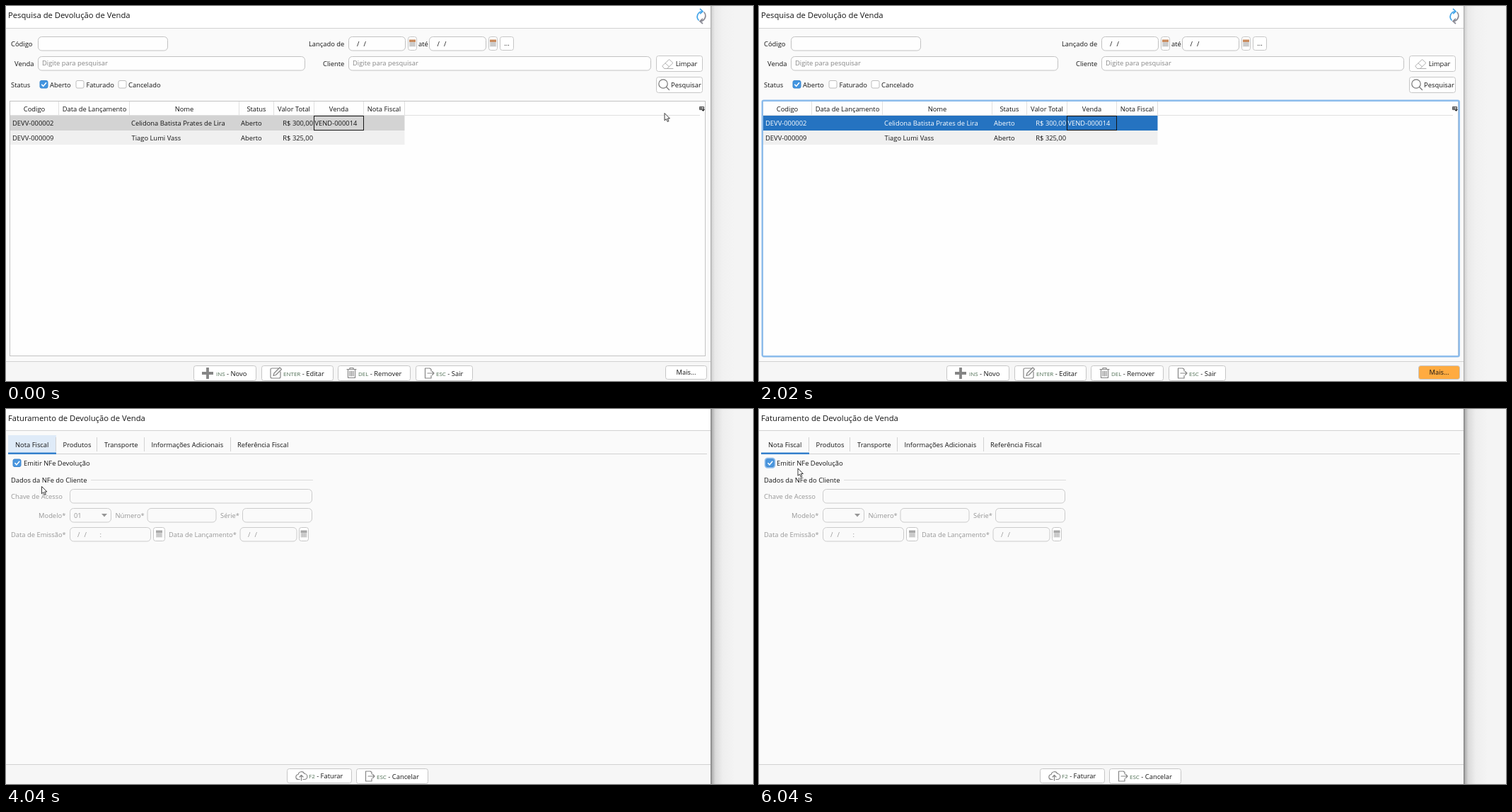
Animation, 1056 px wide and 530 px high, one loop 6540 ms. Source, as an HTML page:

```html
<!DOCTYPE html>
<html lang="pt-BR">
<head>
<meta charset="utf-8">
<title>Devolução de Venda</title>
<style>
html, body { margin: 0; width: 100%; height: 100%; overflow: hidden; background: #f4f4f4; }
svg { display: block; width: 100%; height: 100%; animation: run 6540ms step-end infinite; }
text { font: 9.4px "Open Sans", "Noto Sans", sans-serif; fill: #141414; white-space: pre; }
.title { font-size: 11.25px; }
.key { font-size: 8px; fill: #4f6f54; }
.mid text, .mid { text-anchor: middle; }
.hint { fill: #858585; }
.box rect { height: 19.5px; fill: #fefefe; stroke: #c2c2c2; rx: 5px; }
.btn rect { fill: #fff; stroke: #c6c6c6; rx: 3px; }
.rule { stroke: #d2d2d2; fill: none; }
.icon { fill: none; stroke: #858585; stroke-width: 1.2; stroke-linejoin: round; stroke-linecap: round; }
.ring { fill: none; stroke: #8cbcec; stroke-width: 2.4; }

.list { opacity: var(--list); }
.bill { opacity: var(--bill); }
.pointer { opacity: var(--seen); transform: translate(var(--x), var(--y)); }
.halo { fill: #fe0; opacity: calc(var(--halo) * .56); }

.btn .go { fill: var(--go); }
.go-ring { opacity: var(--go-ring); }
.go-icon { stroke: var(--go-icon); }
.go-text { fill: var(--go-ink); font-weight: var(--go-weight); }

.btn .more { fill: var(--more); }
.more-ring { opacity: var(--more-ring); }
.more-text { fill: var(--more-ink); font-weight: var(--more-weight); }

.table-ring { opacity: var(--table); }
.row { fill: var(--row); }
.picked text { fill: var(--row-ink); }
.menu { opacity: var(--menu); }
.hot { opacity: var(--hot); }

.tab { opacity: var(--tab); }
.check { fill: var(--check); stroke: var(--check-edge); }
.check-ring { opacity: var(--check-ring); }
.tick { fill: none; stroke: #fff; stroke-width: 1.6; }
.toggle { opacity: var(--tick); }
.fields text { fill: var(--ink); }
.fields .box rect { fill: #fafafa; stroke: #cbcbcb; }
.fields .model { opacity: var(--model); }
.fields .cal { --top: var(--cal); }
.arrow { fill: var(--ink); }

@keyframes run {
  0% {
    --list: 1; --bill: 0; --seen: 1; --x: 930.5px; --y: 151px; --halo: 0;
    --go: #fff; --go-ring: 0; --go-icon: #777; --go-ink: #141414; --go-weight: 400;
    --more: #fff; --more-ring: 0; --more-ink: #141414; --more-weight: 400;
    --table: 0; --row: #d3d3d3; --row-ink: #141414; --menu: 0; --hot: 0;
    --tab: 0; --check: #4a97df; --check-edge: #3d86cf; --check-ring: 0; --tick: 1;
    --ink: #969696; --cal: #a8a8a8; --model: 1;
  }
  7.645% { --x: 960px; --y: 113px; --go: #ffab40; }
  15.902% { --halo: 1; --go: #3470b2; --go-ring: 1; --go-icon: #fff; --go-ink: #fff; --go-weight: 700; }
  23.394% {
    --x: 962px; --y: 272px; --halo: 0;
    --go: #fff; --go-ring: 0; --go-icon: #777; --go-ink: #141414; --go-weight: 400;
    --table: 1; --row: #2573c1; --row-ink: #fff;
  }
  30.887% { --seen: 0; --more: #ffab40; }
  38.838% {
    --seen: 1; --x: 988px; --y: 515px; --halo: 1;
    --more: #3470b2; --more-ring: 1; --more-ink: #fff; --more-weight: 700;
    --table: 0; --row: #d3d3d3; --row-ink: #141414;
  }
  46.483% { --halo: 0; --more: #ffab40; --more-ink: #141414; --more-weight: 400; --menu: 1; }
  54.128% { --x: 985px; --y: 465.5px; --halo: 1; --more: #fff; --hot: 1; }
  61.774% { --list: 0; --bill: 1; --x: 50px; --y: 109px; --halo: 0; --tab: 1; }
  69.419% { --x: 54.5px; --y: 83.5px; --halo: 1; --tab: 0; --check: #2b7fd2; --check-ring: 1; }
  77.064% { --halo: 0; --check: #fff; --check-edge: #6ea9e2; --tick: 0; --ink: #141414; --cal: #c98a5c; }
  84.709% { --halo: 1; --check: #d8e8f8; }
  92.355% {
    --halo: 0; --check: #4a97df; --check-edge: #3d86cf; --tick: 1;
    --ink: #969696; --cal: #a8a8a8; --model: 0;
  }
}
</style>
</head>
<body>
<svg viewBox="0 0 1056 530">
<defs>
  <linearGradient id="soft">
    <stop offset="0" stop-color="#979797"/>
    <stop offset=".05" stop-color="#d4d4d4"/>
    <stop offset=".18" stop-color="#e9e9e9"/>
    <stop offset=".5" stop-color="#f1f1f1"/>
    <stop offset="1" stop-color="#f4f4f4"/>
  </linearGradient>
  <linearGradient id="deep">
    <stop offset="0" stop-color="#767676"/>
    <stop offset=".07" stop-color="#b2b2b2"/>
    <stop offset=".2" stop-color="#dadada"/>
    <stop offset=".5" stop-color="#eee"/>
    <stop offset="1" stop-color="#f4f4f4"/>
  </linearGradient>
  <g id="cal">
    <path d="M0 3.500h9v7H0z" fill="#d3d3d3"/>
    <path d="M0 .500h9v3.400H0z" style="fill: var(--top, #c98a5c)"/>
    <path d="M1 6h7M1 8.500h7M3 4.500v5.500M6 4.500v5.500" stroke="#b8b8b8" stroke-width=".5"/>
  </g>
  <g id="exit" class="icon">
    <path d="M9 4.500V2L7 .500H.500v14H9V11M4 7.500h9M10.500 5l2.500 2.500-2.500 2.500"/>
  </g>
</defs>

<!-- window -->
<rect width="1056" height="530" fill="#f4f4f4"/>
<rect width="996" height="530" fill="#fafafa"/>
<rect width="996" height="31" fill="#fff"/>
<rect y="502" width="996" height="28" fill="#f6f6f6"/>
<path class="rule" d="M0 502.500H996"/>

<!-- search list -->
<g class="list">
  <rect x="996" width="34" height="530" fill="url(#soft)"/>
  <path class="rule" d="M0 31.500H996"/>
  <text class="title" x="3" y="16.500">Pesquisa de Devolução de Venda</text>
  <g fill="none" stroke-width="1.700">
    <path d="M979.500 20.500A7.600 7.600 0 0 1 984.500 7.500M981 3.800l4 3.800-4 3.400" stroke="#45a5e8"/>
    <path d="M986.500 8.500a7.600 7.600 0 0 1-5 13M985 17.800l-4 3.700 4 3.500" stroke="#8b8b95"/>
  </g>

  <g class="box">
    <rect x="45.500" y="43.500" width="183"/>
    <rect x="45.500" y="71.500" width="377"/>
    <rect x="484.500" y="43.500" width="80"/>
    <rect x="598.500" y="43.500" width="80"/>
    <rect x="484.500" y="71.500" width="427"/>
  </g>
  <text x="7" y="56.500">Código</text>
  <text x="12" y="84.500">Venda</text>
  <text x="7" y="114.500">Status</text>
  <text x="428" y="56.500">Lançado de</text>
  <text x="583" y="56.500">até</text>
  <text x="448" y="84.500">Cliente</text>
  <text class="hint" x="51" y="84">Digite para pesquisar</text>
  <text class="hint" x="490" y="84">Digite para pesquisar</text>
  <text x="496 505.500" y="57">//</text>
  <text x="609.500 619" y="57">//</text>

  <g class="btn">
    <rect x="568.500" y="43.500" width="12" height="19"/>
    <rect x="682.500" y="43.500" width="12" height="19"/>
    <rect x="698.500" y="43.500" width="19" height="19"/>
    <rect x="919.500" y="70.500" width="65" height="22"/>
    <rect class="go" x="919.500" y="100.500" width="65" height="22"/>
  </g>
  <use href="#cal" x="570" y="47"/>
  <use href="#cal" x="684" y="47"/>
  <text class="mid" x="708" y="56">...</text>
  <path class="icon" d="M928 84.500l9.500-9 5.500 5-8.500 8h-3.500zM932 80.800l5.500 5M931 88.500h12" style="stroke: #b0b0b0; stroke-width: 1"/>
  <text class="mid" x="962" y="84.500">Limpar</text>
  <g class="icon go-icon">
    <circle cx="929" cy="110" r="6.200"/>
    <path d="M933.500 114.500l4 4"/>
  </g>
  <rect class="ring go-ring" x="918.500" y="99.300" width="67" height="24" rx="3"/>
  <text class="mid go-text" x="961.500" y="114.500">Pesquisar</text>

  <rect x="48" y="105.500" width="11" height="10.500" rx="2" fill="#4295e0" stroke="#3986ce"/>
  <path class="tick" d="M50.300 110.800l2.400 2.600 4.300-5.200"/>
  <g fill="#fff" stroke="#bdbdbd">
    <rect x="99" y="105.500" width="11" height="10.500" rx="2"/>
    <rect x="159" y="105.500" width="11" height="10.500" rx="2"/>
  </g>
  <text x="62" y="114.500">Aberto</text>
  <text x="113.500" y="114.500">Faturado</text>
  <text x="173" y="114.500">Cancelado</text>

  <!-- results -->
  <rect x="5.500" y="134.500" width="983" height="360" fill="#fefefe" stroke="#c4c4c4"/>
  <path class="rule" style="stroke: #e0e0e0" d="M6 154.500H981M74.500 135v20M174.500 135v20M329.500 135v20M378.500 135v20M435.500 135v20M505.500 135v20M563.500 135v20"/>
  <path d="M980.500 142.500h6v4h-6zM980.500 144.500h6M982.500 142.500v4" fill="none" stroke="#333" stroke-width=".9"/>
  <path d="M983 146h5l-2.500 3z" fill="#222"/>
  <g class="mid">
    <text x="40" y="148.500">Codigo</text>
    <text x="125" y="148.500">Data de Lançamento</text>
    <text x="252" y="148.500">Nome</text>
    <text x="354" y="148.500">Status</text>
    <text x="407" y="148.500">Valor Total</text>
    <text x="470.500" y="148.500">Venda</text>
    <text x="534.500" y="148.500">Nota Fiscal</text>
  </g>
  <rect class="row" x="6" y="155" width="557.500" height="21"/>
  <rect x="6" y="176" width="557.500" height="20" fill="#f0f0f0"/>
  <rect x="435.500" y="155.500" width="70" height="20" fill="none" stroke="#161616"/>
  <g class="picked">
    <text x="9" y="169">DEVV-000002</text>
    <text x="177" y="169">Celidona Batista Prates de Lira</text>
    <text x="332" y="169">Aberto</text>
    <text x="434" y="169" text-anchor="end">R$ 300,00</text>
    <text x="436.500" y="169">VEND-000014</text>
  </g>
  <text x="9" y="189.500">DEVV-000009</text>
  <text x="177.500" y="189.500">Tiago Lumi Vass</text>
  <text x="332" y="189.500">Aberto</text>
  <text x="434" y="189.500" text-anchor="end">R$ 325,00</text>
  <rect class="ring table-ring" x="4.700" y="133.700" width="985" height="361.600" rx="2"/>

  <!-- actions -->
  <g class="btn">
    <rect x="265.500" y="508.500" width="88" height="21"/>
    <rect x="361.500" y="508.500" width="101" height="21"/>
    <rect x="469.500" y="508.500" width="102" height="21"/>
    <rect x="579.500" y="508.500" width="80" height="21"/>
    <rect class="more" x="932.500" y="508.500" width="58" height="19"/>
  </g>
  <path d="M285 511v16M277 519h16" stroke="#858585" stroke-width="3.800"/>
  <path class="icon" d="M385 512h-9q-2 0-2 2v10q0 2 2 2h10q2 0 2-2v-7M378 522.500l1-3.500 8-8 2.500 2.500-8 8z"/>
  <path class="icon" d="M482 513.500h13M486 513.500v-2h5v2M483.500 513.500v12h10v-12M486.200 516v7M488.500 516v7M490.800 516v7"/>
  <use href="#exit" x="592" y="511.500"/>
  <text x="297" y="522.500"><tspan class="key">INS</tspan> - Novo</text>
  <text x="392" y="522.500"><tspan class="key">ENTER</tspan> - Editar</text>
  <text x="498" y="522.500"><tspan class="key">DEL</tspan> - Remover</text>
  <text x="608" y="522.500"><tspan class="key">ESC</tspan> - Sair</text>
  <rect class="ring more-ring" x="931.700" y="507.600" width="60" height="20.800" rx="3"/>
  <text class="mid more-text" x="961.500" y="521">Mais...</text>

  <g class="menu">
    <rect x="932" y="456" width="122" height="52" fill="#000" opacity=".1"/>
    <rect x="930.500" y="455.500" width="122" height="51" fill="#fff" stroke="#bdbdbd"/>
    <g class="hot">
      <rect x="931" y="456" width="121" height="24" fill="#e7e7e7"/>
      <rect x="931" y="457" width="3" height="21" fill="#3f88d2"/>
    </g>
    <path class="rule" d="M931 480.500h121"/>
    <text x="954" y="471">Faturamento</text>
    <text x="1030" y="471" style="fill: #777">F2</text>
    <text x="954.500" y="497" style="fill: #9a9a9a">Documento Fiscal</text>
  </g>
</g>

<!-- billing form -->
<g class="bill">
  <rect x="996" width="34" height="530" fill="url(#deep)"/>
  <path class="rule" d="M0 30.500H996"/>
  <text class="title" x="3" y="16.500">Faturamento de Devolução de Venda</text>
  <rect class="tab" x="3" y="37" width="68" height="26" fill="#dfebf8"/>
  <path class="rule" d="M3 63.500H991M70.500 40v20M128.500 40v20M195.500 40v20M317.500 40v20"/>
  <rect x="3" y="61.500" width="68" height="2.500" fill="#3480cc"/>
  <text x="13" y="54">Nota Fiscal</text>
  <text x="80.500" y="54">Produtos</text>
  <text x="139" y="54">Transporte</text>
  <text x="205.500" y="54">Informações Adicionais</text>
  <text x="327" y="54">Referência Fiscal</text>

  <rect class="ring check-ring" x="9" y="70" width="13" height="12.500" rx="3"/>
  <rect class="check" x="10" y="71" width="11" height="10.500" rx="2"/>
  <path class="tick toggle" d="M12.500 76.300l2.400 2.600 4.300-5.200"/>
  <text x="25" y="80">Emitir NFe Devolução</text>
  <text x="7" y="104">Dados da NFe do Cliente</text>
  <path class="rule" style="stroke: #dcdcdc" d="M120 100.500H434"/>

  <g class="fields">
    <g class="box">
      <rect x="90.500" y="113.500" width="342"/>
      <rect x="90.500" y="140.500" width="58"/>
      <rect x="200" y="140.500" width="97"/>
      <rect x="334.500" y="140.500" width="98"/>
      <rect x="90.500" y="167.500" width="114"/>
      <rect x="331" y="167.500" width="80"/>
    </g>
    <g class="btn">
      <rect x="208.500" y="167.500" width="16" height="19"/>
      <rect x="414.500" y="167.500" width="13" height="19"/>
    </g>
    <use class="cal" href="#cal" x="212" y="171"/>
    <use class="cal" href="#cal" x="416.500" y="171"/>
    <path class="arrow" d="M135 148h8l-4 4.500z"/>
    <text x="7" y="126.500">Chave de Acesso</text>
    <text x="46" y="153.500">Modelo*</text>
    <text class="model" x="96" y="153.500">01</text>
    <text x="154.500" y="153.500">Número*</text>
    <text x="303" y="153.500">Série*</text>
    <text x="7" y="180.500">Data de Emissão*</text>
    <text x="101 110.500 132.500" y="180.500">//:</text>
    <text x="230" y="180.500">Data de Lançamento*</text>
    <text x="342 351.500" y="180.500">//</text>
  </g>

  <g class="btn">
    <rect x="397.500" y="508.500" width="91" height="20"/>
    <rect x="495.500" y="508.500" width="101" height="21"/>
  </g>
  <path class="icon" d="M415 523.500h-1.500a3.500 3.500 0 0 1-.300-7 4.500 4.500 0 0 1 8.600-1 4 4 0 0 1 .200 8H420M417.500 525v-7M415 520l2.500-2.500 2.500 2.500"/>
  <use href="#exit" x="508" y="511.500"/>
  <text x="428" y="522"><tspan class="key">F2</tspan> - Faturar</text>
  <text x="524" y="522.500"><tspan class="key">ESC</tspan> - Cancelar</text>
</g>

<g class="pointer">
  <circle class="halo" cx=".5" cy="1.300" r="10"/>
  <path d="M.5 .5v10.300l2.400-2.200 1.800 3.900 1.700-.8-1.700-3.700h3.200z" fill="#fff" stroke="#222" stroke-width=".9"/>
</g>
</svg>
</body>
</html>
```
